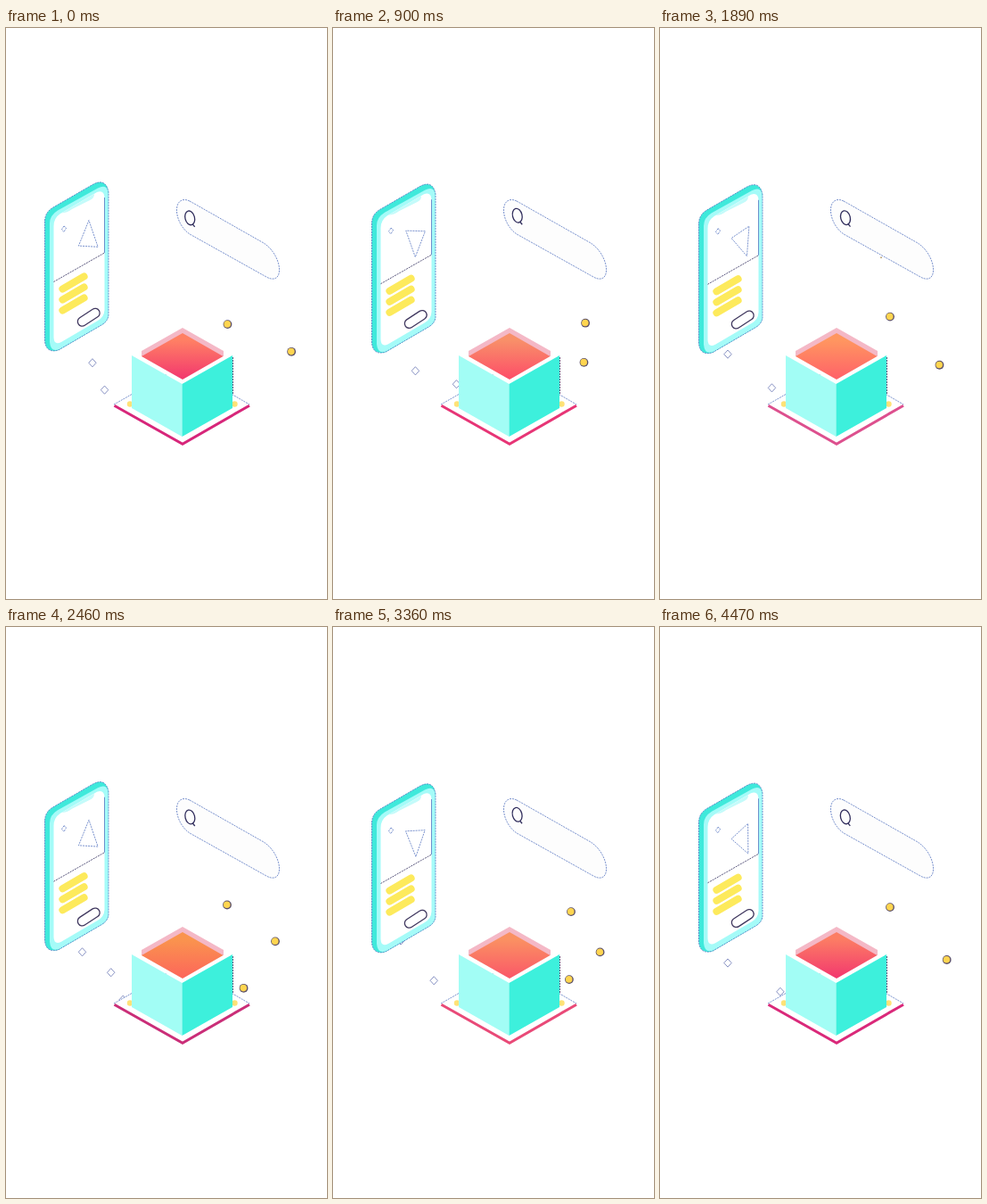
An HTML page for the animation above (4.5 s loop, 360 px wide and 640 px high).

```html
<!DOCTYPE html>
<html lang="en">
<head>
<meta charset="utf-8">
<title>Isometric flow</title>
<style>
  html, body { margin: 0; width: 100%; height: 100%; overflow: hidden; background: #fff; }
  svg { display: block; width: 100vw; height: 100vh; }
  .thin { fill: none; stroke: #3f62b8; stroke-width: .7; }
  .ink { fill: none; stroke: #302d5c; stroke-width: 1.3; }
  .fine { stroke-width: .8; }
  .bars { stroke: #fdea5c; stroke-width: 8.2; stroke-linecap: round; }
  .dots { stroke-dasharray: 2 1; }
</style>
</head>
<body>
<svg viewBox="0 0 360 640">
  <defs>
    <linearGradient id="liquid" x1="0" y1="0" x2="0" y2="1">
      <stop id="hot" offset=".15"/>
      <stop id="deep" offset=".95"/>
    </linearGradient>
    <g id="coin">
      <circle r="4.9" fill="#5c5068"/>
      <circle cx="-.3" cy="-.2" r="3.8" fill="#ffd550"/>
    </g>
    <path id="chip" d="M0-4.6L4.2 0 0 4.6-4.2 0Z" fill="#fff" stroke="#6a76b4" stroke-width=".8"/>
  </defs>

  <g id="flow"></g>

  <g id="phone">
    <path d="M43.5 216Q44 206 53 201L98 175Q112 168 115 184V322Q114 329 107 333L59 361Q45 365 43.5 351Z" fill="#3fe9db"/>
    <path d="M49 219Q49 210 58 204.5L103 179.5Q114 174 115 186V322Q114 329 107 333L60 360Q50 364 49 352Z" fill="#a5fbf8"/>
    <path d="M53.5 222Q53.5 213 61 208L102 184Q110 181 110.5 190V316Q110 324 103 328L62 352Q54 356 53.5 347Z" fill="#fff"/>
    <path d="M62 207.5Q69 207 74 203L94 193Q99 191 99 186Z" fill="#c4fbfa"/>
    <path class="thin dots" d="M43.5 216Q44 206 53 201L98 175Q112 168 115 184V322Q114 329 107 333L59 361Q45 365 43.5 351Z"/>
    <path class="thin" d="M110.5 190V252"/>
    <path class="ink fine dots" d="M53.5 284.5L110.5 252"/>
    <path class="thin dots" d="M65 222l2.6 2-2.6 4.6-2.6-2.6Z"/>
    <path id="tri" class="thin dots"/>
    <path class="bars" d="M63.5 292.5L87.5 278.5M63.5 304.5L87.5 290.5M63.5 316.5L87.5 302.5"/>
    <g stroke-linecap="round">
      <path d="M85.5 329L100 319.5" stroke="#40385f" stroke-width="11.6"/>
      <path d="M85.5 329L100 319.5" stroke="#fff" stroke-width="9"/>
    </g>
  </g>

  <path class="thin dots" style="fill:#fdfdfd" d="M206 194L289 241C300 248 307 262 306.5 272C306 282 299 283 292 279L206 231C197 225 191 213 191.5 203C192 193 199 190.5 206 194Z"/>
  <g id="lens" class="ink">
    <ellipse rx="5.3" ry="8" transform="rotate(-14)"/>
    <path d="M3 7L5.5 10"/>
  </g>

  <path d="M121 422L198 378 273 422 198 466Z" fill="#fff"/>
  <path class="thin dots" d="M121 422L198 378 273 422"/>
  <path id="edge" d="M121.5 423.2L198 466.2 273 423.2" fill="none" stroke-width="3"/>
  <circle cx="139" cy="421.5" r="3.2" fill="#ffe277"/>
  <circle cx="256.5" cy="421.5" r="3.2" fill="#ffe277"/>

  <path d="M141 367L198 335 254 367 198 399Z" fill="#fff"/>
  <path d="M141 367L197.5 399V458L141 426Z" fill="#a2fdf5"/>
  <path d="M254 367L197.5 399V458L254 426Z" fill="#3df0dc"/>
  <path class="ink fine dots" d="M254.5 369V411"/>
  <path d="M198 336L244 362V368H152V362Z" fill="#f4b8c6"/>
  <path d="M198 342L243.5 368 198 394 152 368Z" fill="url(#liquid)"/>
</svg>
<script>
const LOOP = 4500, CYCLE = 2680, TAU = Math.PI * 2;
const COS = Math.cos(Math.PI / 6), SIN = .5;
const get = id => document.getElementById(id);
const clamp = v => Math.max(0, Math.min(1, v));
const wrap = (v, lo, span) => lo + ((v - lo) % span + span) % span;
const wave = (t, period) => (1 - Math.cos(TAU * t / period)) / 2;
const move = (el, x, y, size = 1) =>
  el.setAttribute('transform', `translate(${x.toFixed(2)} ${y.toFixed(2)}) scale(${size.toFixed(3)})`);

// s is the distance from the box; coins shrink away at the bar and at the box.
function coinAt(s, r) {
  const a = (r.right - 256) / COS, b = (r.right - r.col) / COS;
  if (s < a) return [256 + s * COS, 363 + (a - s) * SIN, clamp((s + 3) / 8)];
  if (s < a + b) return [r.right - (s - a) * COS, 363 - (s - a) * SIN];
  const y = 363 - b * SIN - (s - a - b);
  const bar = 256 + (r.col - 248) * SIN / COS;
  return [r.col, y, clamp((y - bar) / 8)];
}

// s is the distance from the corner, negative on the upright part.
function chipAt(s, r) {
  return s < 0 ? [r.col, r.y + s] : [r.col + s * COS, r.y + s * SIN];
}

const routes = [
  { kind: 'coin', right: 339, col: 267, start: 246, lo: -9 },
  { kind: 'coin', right: 320.5, col: 258, start: 75, lo: -24 },
  { kind: 'coin', right: 302, col: 248, start: 115, lo: -45 },
  { kind: 'chip', col: 76, y: 385.7, start: 40, lo: -75 },
  { kind: 'chip', col: 85.5, y: 380.3, start: 106.2, lo: -42 },
  { kind: 'chip', col: 95.3, y: 374.3, start: 2, lo: -60 }
];
const kinds = {
  coin: { at: coinAt, speed: .095, span: .095 * CYCLE },
  chip: { at: chipAt, speed: .109, span: .109 * CYCLE / 2 }
};

for (const r of routes) {
  r.el = document.createElementNS('http://www.w3.org/2000/svg', 'use');
  r.el.setAttribute('href', '#' + r.kind);
  get('flow').append(r.el);
}

// time, liquid top, liquid bottom, plate edge
const tints = [
  [0, [255, 128, 100], [243, 58, 110], [215, 38, 122]],
  [540, [250, 150, 98], [250, 82, 102], [224, 46, 124]],
  [1230, [246, 138, 112], [255, 78, 106], [238, 60, 112]],
  [1890, [255, 150, 96], [255, 100, 104], [221, 80, 142]],
  [2460, [250, 148, 78], [252, 104, 90], [202, 46, 120]],
  [3360, [250, 145, 98], [250, 90, 104], [233, 74, 120]],
  [4500, [252, 124, 100], [243, 58, 110], [218, 40, 122]]
];

function tint(t, k) {
  const i = tints.findIndex(row => row[0] > t);
  const a = tints[i - 1], b = tints[i], f = (t - a[0]) / (b[0] - a[0]);
  return `rgb(${a[k].map((v, j) => Math.round(v + (b[k][j] - v) * f))})`;
}

function triangle(t) {
  const turn = 32 + 72 * wave(t, 2500);
  const pts = [0, 120, 240].map(d => {
    const q = (turn + d) * TAU / 360;
    return (92.5 + 12.5 * Math.cos(q)).toFixed(2) + ' ' + (235 + 19.5 * Math.sin(q)).toFixed(2);
  });
  return `M${pts.join('L')}Z`;
}

function draw(t) {
  for (const r of routes) {
    const k = kinds[r.kind];
    move(r.el, ...k.at(wrap(r.start - k.speed * t, r.lo, k.span), r));
  }
  move(get('phone'), 0, 3 * wave(t, CYCLE / 2));
  get('tri').setAttribute('d', triangle(t));
  const q = TAU * (t / 2500 + .355);
  move(get('lens'), 207 + 1.3 * Math.cos(q), 211.7 + 1.5 * Math.sin(q));
  get('hot').setAttribute('stop-color', tint(t, 1));
  get('deep').setAttribute('stop-color', tint(t, 2));
  get('edge').setAttribute('stroke', tint(t, 3));
}

const begin = performance.now();
function tick() {
  draw((performance.now() - begin) % LOOP);
  requestAnimationFrame(tick);
}
tick();
</script>
</body>
</html>
```
